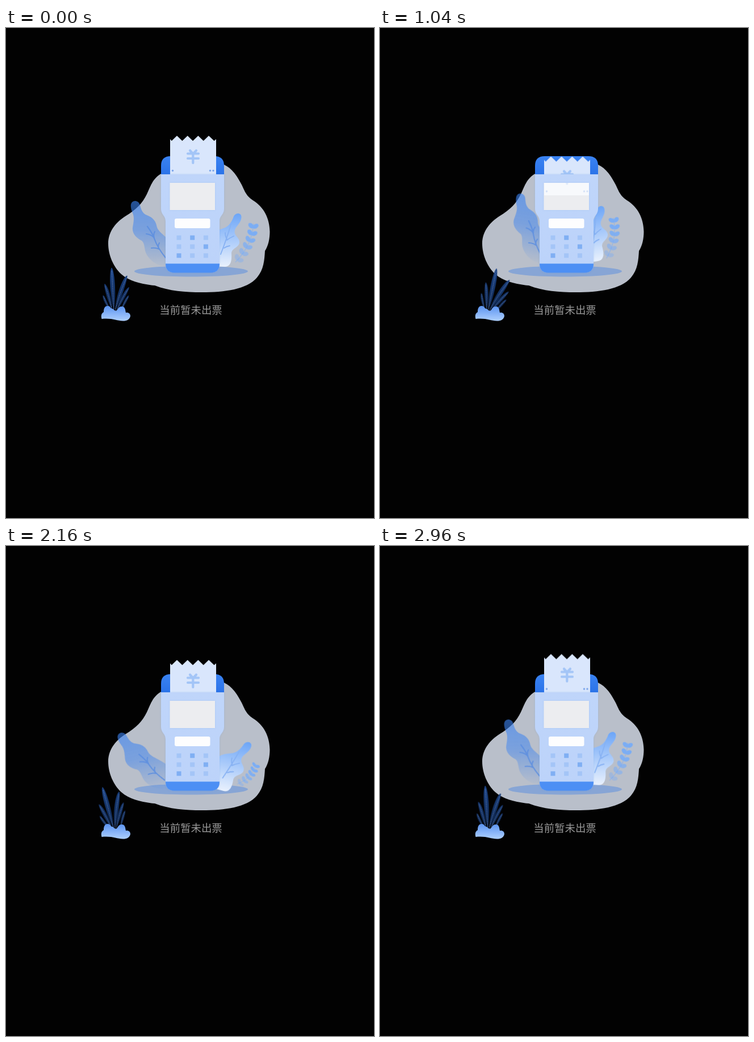
Animation of 648x864 px, one loop 3000 ms. Source, as an HTML page:

```html
<!DOCTYPE html>
<html lang="zh-CN">
<head>
<meta charset="utf-8">
<title>当前暂未出票</title>
<style>
  html, body { margin: 0; width: 100%; height: 100%; overflow: hidden; background: #020202; }
  svg { display: block; width: 648px; height: 864px; }
  text { font: 18.4px "Noto Sans CJK SC", "Noto Sans CJK", sans-serif; fill: #999; text-anchor: middle; }

  /* Three one-second legs at 25 steps per second */
  .move { animation: 3s steps(25, end) infinite; transform-box: view-box; }
  .paper { animation-name: feed; }
  .leaf-l { animation-name: sway-l; transform-origin: 310px 416px; }
  .leaf-r { animation-name: sway-r; transform-origin: 336px 419px; }
  .grass { animation-name: sway-grass; transform-origin: 190px 500px; }
  .sprig { animation-name: sway-sprig; transform-origin: 0 0; }

  @keyframes feed {
    0%, 100% { transform: translateY(0); }
    33.3333% { transform: translateY(37.5px); }
    66.6667% { transform: translateY(13px); }
  }
  @keyframes sway-l {
    0%, 100% { transform: rotate(0deg); }
    33.3333% { transform: rotate(11.5deg); }
    66.6667% { transform: rotate(-17.4deg); }
  }
  @keyframes sway-r {
    0%, 100% { transform: rotate(0deg); }
    33.3333% { transform: rotate(-13deg); }
    66.6667% { transform: rotate(15.6deg); }
  }
  @keyframes sway-grass {
    0%, 100% { transform: rotate(0deg); }
    33.3333% { transform: rotate(15.5deg); }
    66.6667% { transform: rotate(-14.5deg); }
  }
  @keyframes sway-sprig {
    0%, 100% { transform: translate(404px, 413px) rotate(25deg) scale(1, 1); }
    33.3333% { transform: translate(398.5px, 405.5px) rotate(8deg) scale(1, .98); }
    66.6667% { transform: translate(408px, 421px) rotate(47deg) scale(.8, .58); }
  }
</style>
</head>
<body>
<svg viewBox="0 0 648 864">
  <defs>
    <linearGradient id="gLeafL" x2="0" y2="1">
      <stop stop-color="#3b82f0" stop-opacity=".63"/>
      <stop offset=".45" stop-color="#3b82f0" stop-opacity=".5"/>
      <stop offset="1" stop-color="#3b82f0" stop-opacity=".03"/>
    </linearGradient>
    <linearGradient id="gLeafR" x2="0" y2="1">
      <stop stop-color="#6ca5f7"/>
      <stop offset="1" stop-color="#e9f1fd"/>
    </linearGradient>
    <linearGradient id="gMound" x2="0" y2="1">
      <stop stop-color="#5b93f0"/>
      <stop offset="1" stop-color="#aed0fe"/>
    </linearGradient>
    <linearGradient id="gBlade" gradientUnits="userSpaceOnUse" x1="0" y1="423" x2="0" y2="497">
      <stop stop-color="#1b4488"/>
      <stop offset="1" stop-color="#0d2349"/>
    </linearGradient>
    <linearGradient id="gCap" x2="0" y2="1">
      <stop stop-color="#3a83f2"/>
      <stop offset="1" stop-color="#2a72e8"/>
    </linearGradient>
    <linearGradient id="gBody" x2="0" y2="1">
      <stop stop-color="#bfd5fa"/>
      <stop offset="1" stop-color="#bcd3fa"/>
    </linearGradient>
    <filter id="soft" x="-20%" y="-20%" width="140%" height="140%">
      <feDropShadow dx="0" dy="0" stdDeviation="1.6" flood-color="#5f8fd8" flood-opacity=".25"/>
    </filter>
    <clipPath id="slot"><rect x="280" y="180" width="100" height="78"/></clipPath>
    <clipPath id="screen"><rect x="288.5" y="273" width="79.5" height="48"/></clipPath>
    <g id="marks">
      <path d="M324 216L329.3 222L335 216M320 221.5H339M320 230H339M329.3 222V238"
            fill="none" stroke="#a3c5f7" stroke-width="4.2" stroke-linecap="round" stroke-linejoin="round"/>
      <g fill="#7ba5ea">
        <circle cx="293.5" cy="251.5" r="1.7"/>
        <circle cx="359.5" cy="251.5" r="1.7"/>
        <circle cx="365" cy="251.5" r="1.7"/>
      </g>
    </g>
  </defs>

  <!-- Cloud and ground -->
  <path fill="#b9bfca" d="M273 257C258 266 255 278 248 293C240 309 230 320 210 332
    C196 341 180 357 180 380C180 400 189 421 203 434C218 447 240 452 262 454
    C288 464 315 466 345 466C385 466 424 461 442 440C454 426 455 409 456 393
    C462 384 464.5 371 464.5 359C464 335 454 316 435 304
    C420 294 420 284 412 271C404 256 395 246 384 241Z"/>
  <ellipse cx="326" cy="429" rx="100" ry="9.5" fill="#87a5d5"/>

  <!-- Leaves -->
  <g class="move leaf-l">
    <path fill="url(#gLeafL)" d="M220 316C218 303 232 302 235.500 311C238 320 240 327 248 330
      C259 334 264 341 265.500 350C268 361 284 367 296 386L296 420H280C264 419 252 408 247 398
      C243 390 245 380 239 375C229 370 222 362 223 352C224.500 343 226 336 224 329C222 323 220.500 321 220 316Z"/>
    <path fill="none" stroke="#5b8de0" stroke-width="2.2" stroke-linecap="round" stroke-opacity=".85"
      d="M249 350Q258 362 261 371Q267 388 281 405M247 363Q255 364 260 369M262 359Q259 364 261 370
      M256 388Q264 387 270 390M270 379Q267 384 269 389"/>
  </g>
  <g class="move sprig" id="sprig"></g>
  <g class="move leaf-r">
    <path fill="url(#gLeafR)" d="M400 335C402 325 415 324 414.5 334C414 345 403 350 402.5 359
      C403 368 412 370 411 379C409 388 397 388 397 398C398 412 395 421 385 421
      L362 420V366C366 357 379 355 386 352C394 348 397 341 400 335Z"/>
    <path fill="none" stroke="#86b1f3" stroke-width="1.8" stroke-linecap="round"
      d="M396 346Q390 368 378 399M386 361Q386 368 389 372M401 367Q394 370 389 374M394 384Q388 385 384 388"/>
  </g>

  <!-- Device -->
  <path fill="url(#gCap)" d="M273 260V243Q273 226 290 226H367Q384 226 384 243V260Z"/>
  <g clip-path="url(#slot)">
    <g class="move paper">
      <path fill="#d9e6fc" d="M289 258V196L291.7 199L301 190L310.4 199L319.7 190L329 199
        L338.4 190L347.7 199L357 190L366.5 199L370 196V258Z"/>
      <use href="#marks"/>
    </g>
  </g>
  <path fill="url(#gBody)" filter="url(#soft)" d="M273 258H384V318C384 330 376 330 376 341V416
    Q376 431 361 431H296Q281 431 281 416V341C281 330 273 330 273 318Z"/>
  <path fill="#4c8ff4" d="M281 415.5H376V416Q376 431.5 360 431.5H297Q281 431.5 281 416Z"/>
  <rect x="288.5" y="273" width="79.5" height="48" fill="#ecedf0" filter="url(#soft)"/>
  <g clip-path="url(#screen)">
    <g class="move paper">
      <rect x="289" y="200" width="81" height="58" fill="#f7f9fc"/>
      <use href="#marks" opacity=".28"/>
    </g>
  </g>
  <rect x="297" y="336" width="62.5" height="17" rx="3" fill="#fdfdfe"/>
  <g id="keys"></g>

  <!-- Grass -->
  <g class="move grass" id="grass"></g>
  <path fill="url(#gMound)" d="M168.5 513C167 507 168 503 172 501C172 494 174 490 179 490
    C184 490 184 495 187 495C190 495 190 499 194 498.5C197 498 197 491 204 491
    C210 491 210 497 211 502C215 501 219 503 219 508C218 514 213 516.5 206 516.5
    C195 516.5 187 511 168.5 513Z"/>

  <text x="325.5" y="504">当前暂未出票</text>
</svg>
<script>
  const add = (parent, tag, attrs) => {
    const el = document.createElementNS("http://www.w3.org/2000/svg", tag);
    for (const k in attrs) el.setAttribute(k, attrs[k]);
    return document.getElementById(parent).appendChild(el);
  };

  // Keypad: one strong key per row
  const strong = [1, 2, 0];
  for (let i = 0; i < 9; i++) {
    const row = Math.floor(i / 3), col = i % 3;
    add("keys", "rect", {
      x: 300.5 + col * 23.7, y: 365.7 + row * 15.8, width: 8, height: 8,
      fill: strong[row] === col ? "#80aff3" : "#a4c5f7"
    });
  }

  // Grass blade from base to tip, with bend and half width
  function blade(bx, by, tx, ty, w, bend) {
    const dx = tx - bx, dy = ty - by, len = Math.hypot(dx, dy);
    const nx = -dy / len, ny = dx / len;
    const at = (k, off) => `${bx + dx * k + nx * off} ${by + dy * k + ny * off}`;
    const side = s => [at(.4, bend + s * w), at(.95, bend + s * w * .7)];
    const [a, b] = side(1), [c, d] = side(-1);
    add("grass", "path", {
      d: `M${bx} ${by}C${a} ${b} ${tx} ${ty}C${d} ${c} ${bx} ${by}Z`, fill: "url(#gBlade)"
    });
    add("grass", "path", {
      d: `M${bx} ${by}Q${at(.5, bend * 1.5)} ${at(.93, 0)}`, fill: "none",
      stroke: "#a9c3ee", "stroke-width": .7, "stroke-opacity": .7, "stroke-dasharray": "2 1"
    });
  }
  blade(183, 497, 171, 471, 3.5, -1);
  blade(187, 498, 173.5, 451, 5, 1);
  blade(203, 497, 216.5, 471.5, 3.5, -1);
  blade(195, 498, 217, 457, 4.5, -1.5);
  blade(192, 499, 213.5, 436.5, 6, -2);
  blade(190, 499, 186, 422.5, 6.5, 0);

  // Sprig: leaflet pairs along a quadratic stem from (0,0) to (0,-75)
  const cx = 14, cy = -40, len = 75;
  add("sprig", "path", {
    d: `M0 0Q${cx} ${cy} 0 ${-len}`, fill: "none",
    stroke: "#84b0f1", "stroke-width": 1.4, "stroke-opacity": .7
  });
  for (let i = 0; i < 6; i++) {
    const s = .06 + i * .168, r = 1 - s;
    const x = 2 * s * r * cx, y = 2 * s * r * cy - s * s * len;
    const vx = 2 * (r - s) * cx, vy = 2 * (r - s) * cy - 2 * s * len;
    const turn = Math.atan2(vx, -vy) * 180 / Math.PI;
    for (const side of [-1, 1]) add("sprig", "ellipse", {
      cx: 0, cy: -5.4, rx: 3.8, ry: 5.6, fill: "#7badf4", "fill-opacity": Math.min(1, .35 + s),
      transform: `translate(${x} ${y}) rotate(${turn + side * 50})`
    });
  }
</script>
</body>
</html>
```
